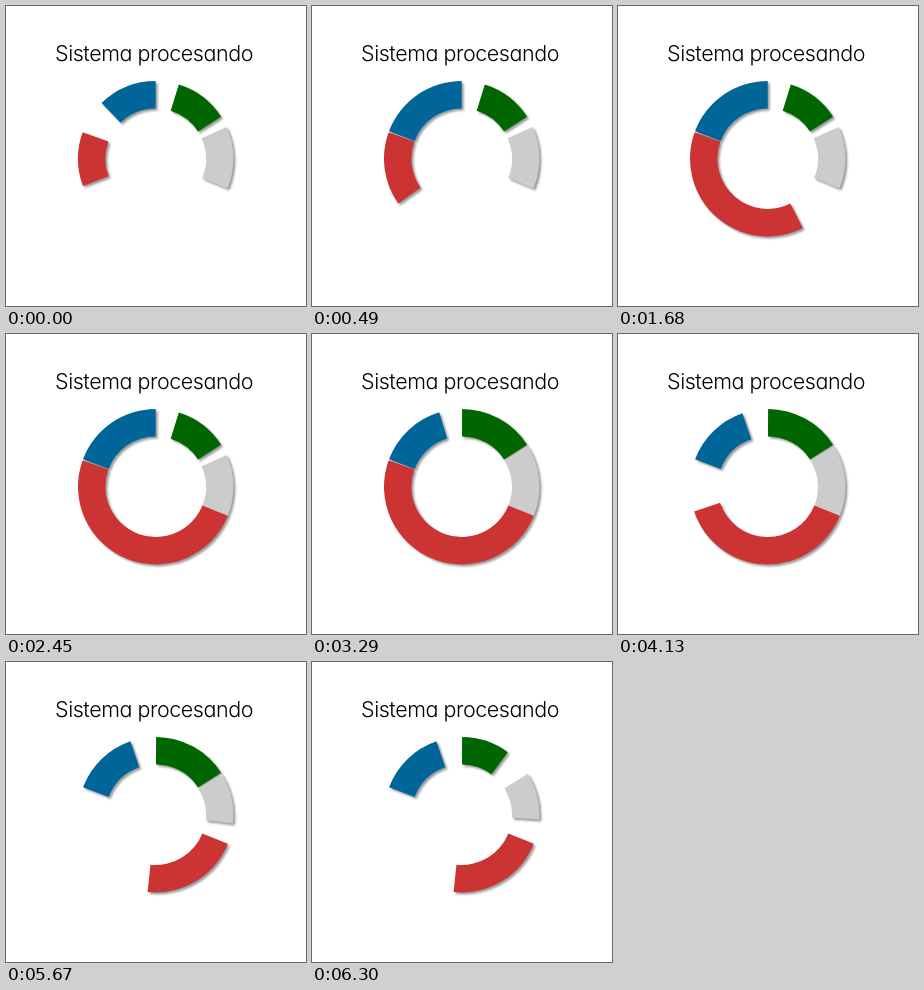
Recreate the animation shown at these times as an HTML page. Size 300x300 px, loop 6.37 s.

```html
<!DOCTYPE html>
<html lang="es">
<head>
<meta charset="utf-8">
<style>
  html, body { margin: 0; width: 100%; height: 100%; overflow: hidden; background: #fff; }
  svg { display: block; width: 100vw; height: 100vh; }
  #ring { filter: drop-shadow(2px 2px 1.3px rgba(0, 0, 0, .4)); }
  text { font: 300 21.5px Inter, Lato, sans-serif; font-feature-settings: "cv11"; letter-spacing: -.45px; }
</style>
</head>
<body>
<svg viewBox="0 0 300 300">
  <text x="148" y="55" text-anchor="middle">Sistema procesando</text>
  <g id="ring"></g>
</svg>
<script>
const LOOP = 6370, STEP = 70;
const CX = 149.7, CY = 152.7, OUTER = 77.7, INNER = 50.3;

// Head and tail are [ms, degrees clockwise from the top] tracks; heads advance counterclockwise.
const segments = [
  { color: '#cccccc',
    head: [[2450, 66], [2630, 58.3]],
    tail: [[5285, 112.6], [5740, 93.5]] },
  { color: '#006600',
    head: [[2630, 17.3], [2980, 0.3]],
    tail: [[5740, 57.3], [6300, 36.4]] },
  { color: '#006699',
    head: [[0, 315.8], [290, 290.7]],
    tail: [[2980, 360], [3330, 341]] },
  { color: '#cc3333',
    head: [[290, 249.5], [700, 219.5], [980, 199.6], [1400, 170], [2100, 128], [2420, 112]],
    tail: [[3400, 289.9], [3570, 282], [3640, 282], [4130, 251.3], [4340, 240.7], [5040, 199.8], [5285, 186]] }
];

function valueAt(track, time) {
  if (time <= track[0][0]) return track[0][1];
  for (let i = 1; i < track.length; i++) {
    const [t0, a] = track[i - 1], [t1, b] = track[i];
    if (time <= t1) return a + (b - a) * (time - t0) / (t1 - t0);
  }
  return track[track.length - 1][1];
}

function point(radius, degrees) {
  const angle = degrees * Math.PI / 180;
  return `${CX + radius * Math.sin(angle)} ${CY - radius * Math.cos(angle)}`;
}

function arcPath(from, to) {
  const large = to - from > 180 ? 1 : 0;
  return `M${point(OUTER, from)}A${OUTER} ${OUTER} 0 ${large} 1 ${point(OUTER, to)}` +
    `L${point(INNER, to)}A${INNER} ${INNER} 0 ${large} 0 ${point(INNER, from)}Z`;
}

const ring = document.getElementById('ring');
for (const segment of segments) {
  segment.path = document.createElementNS('http://www.w3.org/2000/svg', 'path');
  segment.path.setAttribute('fill', segment.color);
  ring.append(segment.path);
}

const start = performance.now();
function draw() {
  const elapsed = Math.max(0, performance.now() - start) % LOOP;
  const time = Math.floor(elapsed / STEP) * STEP;
  for (const { path, head, tail } of segments) {
    path.setAttribute('d', arcPath(valueAt(head, time), valueAt(tail, time)));
  }
  requestAnimationFrame(draw);
}
draw();
</script>
</body>
</html>
```
